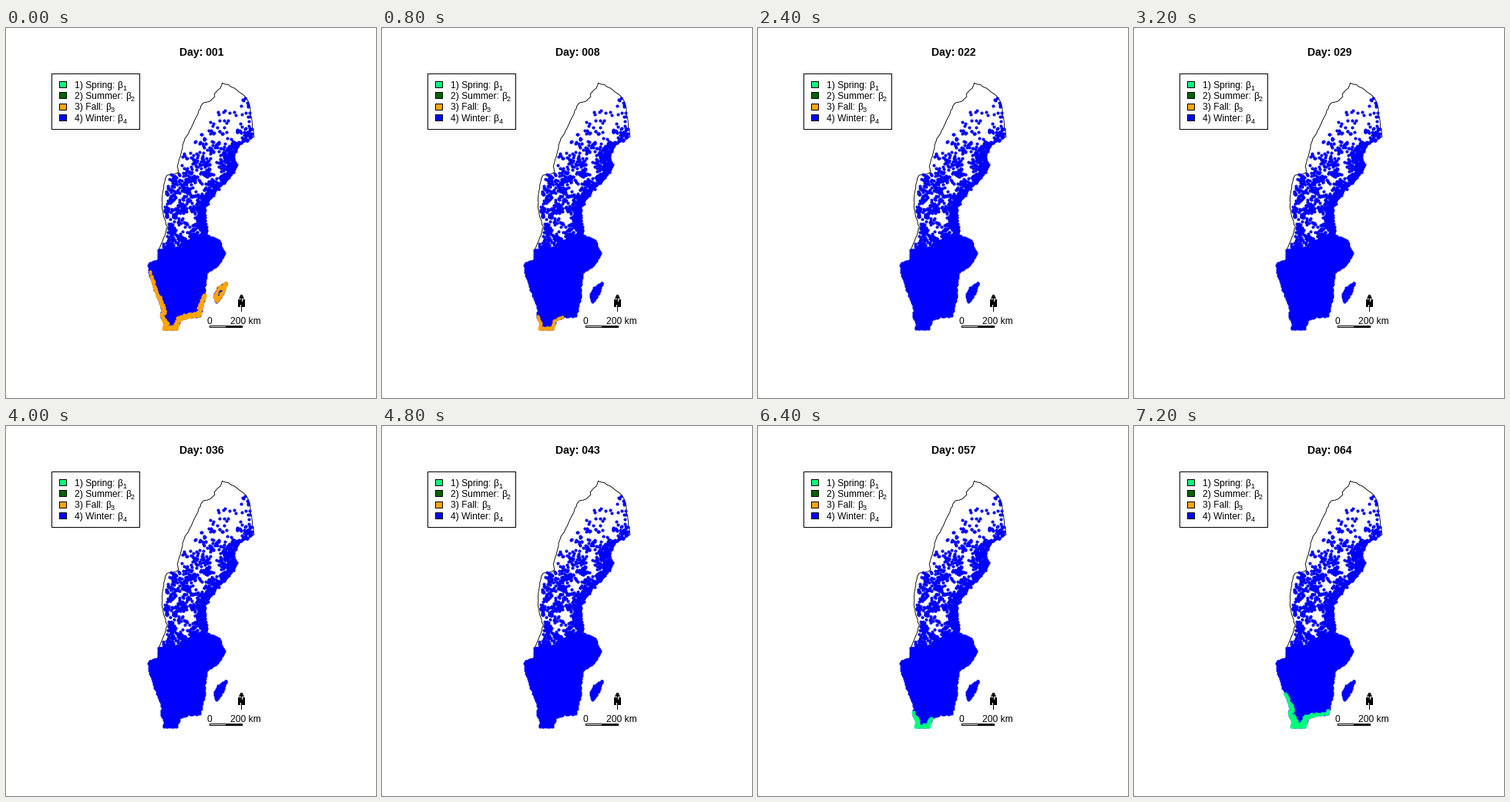
A matplotlib script for the animation above (8000 ms loop, 480 by 480 pixels).

```python
import numpy as np
import matplotlib.pyplot as plt
from matplotlib.animation import FuncAnimation
from matplotlib.patches import Polygon, Rectangle
from matplotlib.path import Path

SIZE = 480
SPRING, SUMMER, FALL, WINTER = "#00ff7f", "#006400", "#ffa500", "#0000ff"
DAYS = range(1, 65, 7)
FULL = 0.4  # sites per square pixel that leave no gaps
# Mild zone along the coast: season, latitude where it starts,
# growth of its depth southwards, greatest depth
FRONTS = {
    1: (FALL, 308, 0.07, 4),
    8: (FALL, 370, 0.1, 1.5),
    15: (FALL, 386, 0.1, 0.4),
    57: (SPRING, 366, 0.25, 3),
    64: (SPRING, 343, 0.16, 7),
}
rng = np.random.default_rng(12)

fig = plt.figure(figsize=(SIZE / 72, SIZE / 72), dpi=72, facecolor="white")
ax = fig.add_axes([0, 0, 1, 1])
ax.set_xlim(0, SIZE)
ax.set_ylim(SIZE, 0)
ax.axis("off")


def along(points, step=2.2, spread=0.5):
    """Jittered dots at even distances along a polyline."""
    p = np.array(points, float)
    s = np.r_[0, np.cumsum(np.hypot(*np.diff(p, axis=0).T))]
    t = np.linspace(0, s[-1], int(s[-1] / step) + 1)
    line = np.c_[np.interp(t, s, p[:, 0]), np.interp(t, s, p[:, 1])]
    return line + rng.uniform(-spread, spread, line.shape)


def scatter_box(x0, x1, y0, y1):
    n = int(FULL * (x1 - x0) * (y1 - y0))
    return np.c_[rng.uniform(x0, x1, n), rng.uniform(y0, y1, n)]


def dots(xy, color, z=2):
    return ax.scatter(xy[:, 0], xy[:, 1], s=17, c=color, linewidths=0,
                      antialiased=False, zorder=z)


def fill(points, color, z=5):
    ax.add_patch(Polygon(points, fc=color, ec="none", antialiased=False,
                         zorder=z))


def box(x, y, w, h, face):
    for inset, color in ((0, "black"), (1, face)):
        ax.add_patch(Rectangle((x + inset, y + inset), w - 2 * inset,
                               h - 2 * inset, fc=color, ec="none",
                               antialiased=False, zorder=5))


def label(x, y, s, size=12, **kw):
    return ax.text(x, y, s, fontsize=size, family="Liberation Sans",
                   va="baseline", zorder=6, **kw)


# Northern borders from north to south, roughened between key points
west = along([(281, 71), (279, 78), (270, 84), (272, 89), (261, 97), (256, 95),
              (250, 108), (241, 129), (231, 145), (222, 181), (224, 187),
              (208, 192), (204, 208), (202, 234), (209, 258), (203, 279),
              (198, 288)], 4, 0.7)
east = along([(281, 71), (291, 75), (308, 86), (316, 98), (322, 142),
              (305, 149), (295, 165), (300, 180), (285, 198), (264, 221),
              (258, 236), (261, 269)], 4, 0.7)
for border in (west, east):
    ax.plot(*border.T, color="black", lw=0.9, zorder=1)

# Fully covered south and the island
bay = [(222, 286), (242, 272), (262, 270), (276, 276), (283, 293), (274, 307),
       (259, 317), (256, 344)]
mild = [(258, 347), (253, 362), (251, 373), (233, 375), (224, 379), (221, 390),
        (204, 390), (206, 384), (201, 372), (204, 366), (194, 341), (187, 318),
        (185, 306)]
inland = [(198, 301), (198, 288), (222, 286)]
south = bay + mild + inland
island = [(285, 331), (276, 337), (270, 348), (273, 355), (281, 344),
          (285, 331)]
for shape in (south, island):
    fill(shape, WINTER, 2)
    dots(along(shape), WINTER)

# Scattered northern sites: patchy, denser southwards and along the coast
xy = scatter_box(198, 323, 83, 290)
x, y = xy.T
left = np.interp(y, west[:, 1], west[:, 0]) + 2
shore = np.interp(y, east[:, 1], east[:, 0]) - 1
patch = rng.exponential(1, (60, 60))[(y // 6).astype(int), (x // 6).astype(int)]
rural = np.interp(y, [85, 120, 150, 200, 260, 290],
                  [.012, .02, .05, .07, .1, .3])
town = 0.13 * np.exp(-((x - 236) / 15) ** 2 - ((y - 205) / 12) ** 2)
coast = np.interp(y, [95, 140, 165], [.01, .1, FULL])
coast *= np.exp(-((shore - x) / 9) ** 2)
inside = (x > left) & (x < shore) & (x > 290 - 0.75 * (y - 85))
chosen = rng.uniform(0, FULL, len(x)) < patch * (rural + town) + coast
dots(xy[inside & chosen], WINTER)
dots(along(east[east[:, 1] > 143], 2.2, 1.5) - [1.5, 0], WINTER)


def mild_sites(shape, coast, shelter, shift):
    """Sites with their depth behind the coast and their latitude in fall."""
    rim = along(coast, 2, 0.4)
    inner = scatter_box(180, 290, 306, 393)
    inner = inner[Path(shape).contains_points(inner)]
    pos = np.r_[rim, inner]
    gap = pos[:, None] - along(coast, 1, 0)[None]
    depth = np.hypot(*gap.T).T.min(axis=1)
    depth += rng.uniform(0, shelter, len(pos))
    return np.c_[pos, depth, pos[:, 1] + shift]


sites = np.r_[mild_sites(south, mild, 0.6, 0),
              mild_sites(island, island, 4, 22)]
pos, depth, fall_lat = sites[:, :2], sites[:, 2], sites[:, 3]
spring_lat = pos[:, 1] - 0.4 * (pos[:, 0] - 200)  # spring comes from southwest
layer = dots(np.empty((0, 2)), WINTER, 3)

# Legend
box(59, 59, 115, 73, "white")
seasons = [("1) Spring: ", SPRING, 144.4), ("2) Summer: ", SUMMER, 155),
           ("3) Fall: ", FALL, 129), ("4) Winter: ", WINTER, 144.4)]
for i, (name, color, end) in enumerate(seasons):
    base = 77.6 + 14.4 * i
    box(69, round(69 + 14.4 * i), 10, 9, color)
    label(89, base, name)
    label(end, base, "β")
    label(end + 7, base + 3, str(i + 1), 9)

# Scale bar
box(264, 386, 22, 3, "white")
box(285, 386, 22, 3, "black")
label(263.5, 384, "0", ha="center")
label(311, 384, "200 km", ha="center")

# North arrow
fill([(305.5, 346), (308.5, 351), (302.5, 351)], "black")
fill([(305, 347), (306, 347), (306, 368), (305, 368)], "black")
for x0 in (301, 307):
    fill([(x0, 352), (x0 + 3, 352), (x0 + 3, 362), (x0, 362)], "black")
fill([(301, 352), (304, 352), (310, 362), (307, 362)], "black")

title = label(253.5, 36, "", 14, weight="bold", ha="center")


def draw(frame):
    day = DAYS[frame]
    title.set_text(f"Day: {day:03d}")
    color, start, slope, cap = FRONTS.get(day, (WINTER, SIZE, 0, 0))
    lat = spring_lat if color == SPRING else fall_lat
    reach = np.clip(slope * (lat - start), 0, cap)
    layer.set_offsets(pos[depth < reach])
    layer.set_facecolor(color)
    return [title, layer]


anim = FuncAnimation(fig, draw, frames=len(DAYS), interval=800, repeat=True,
                     repeat_delay=0)
plt.show()
```
